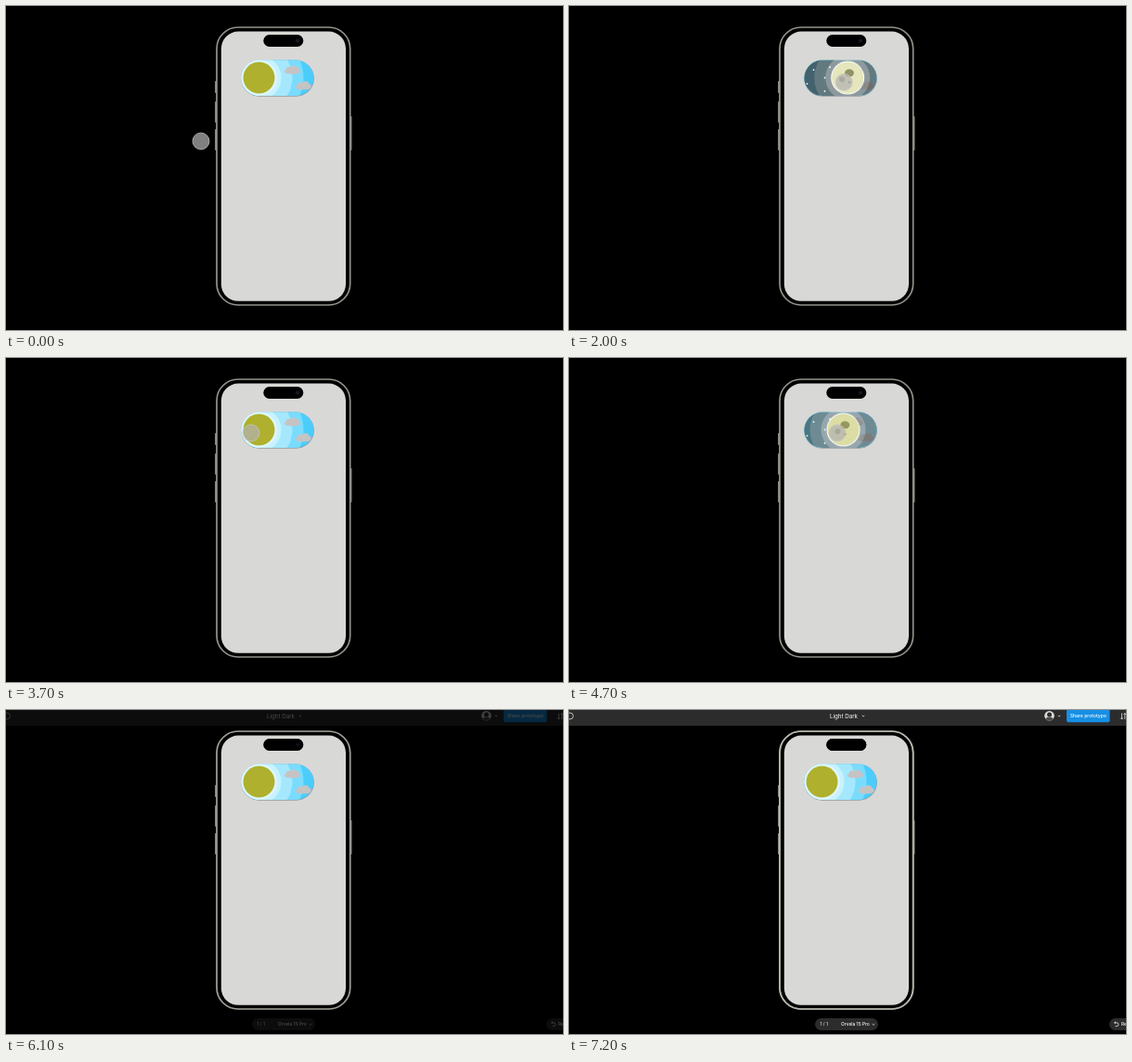
An HTML page for the animation above (7300 ms loop, 600 by 350 pixels).

```html
<!DOCTYPE html>
<html lang="en">
<head>
<meta charset="utf-8">
<title>Light Dark</title>
<style>
  html, body { margin: 0; width: 100%; height: 100%; overflow: hidden; background: #000; }
  svg { display: block; width: 600px; height: 350px; }
  text { font-family: Inter, Roboto, sans-serif; fill: #fff; }
  .line { fill: none; stroke: #e4e4e4; stroke-width: .8; }
</style>
</head>
<body>
<svg viewBox="0 0 600 350">
  <defs>
    <clipPath id="pill"><rect x="253.5" y="58.5" width="78" height="38.5" rx="19.25"/></clipPath>
    <clipPath id="face"><circle cx="517.5" cy="6.2" r="5.3"/></clipPath>
    <path id="caret" d="M-1.3-.6 0 .6 1.3-.6"/>
    <g id="cloud">
      <ellipse cy="1.8" rx="8.5" ry="2.8"/>
      <circle cx="-3" cy="0" r="3.4"/>
      <circle cx="2.5" cy="-1" r="3.8"/>
      <circle cx="6" cy="1" r="2.8"/>
    </g>
  </defs>

  <g id="phone">
    <g fill="#85867d">
      <rect x="225" y="81" width="2" height="13" rx=".8"/>
      <rect x="225" y="103" width="2" height="23" rx=".8"/>
      <rect x="225" y="133" width="2" height="23" rx=".8"/>
      <rect x="370.5" y="119" width="2" height="37" rx=".8"/>
    </g>
    <rect x="227" y="23" width="143.7" height="300" rx="23" fill="#000" stroke="#92938a" stroke-width="1.7"/>
    <rect x="231.8" y="27.5" width="134.2" height="291.3" rx="18.5" fill="#d8d8d6"/>
    <rect x="277.3" y="31" width="43" height="13" rx="6.5"/>
    <circle cx="314" cy="37.5" r="2.3" fill="#11131b"/>
    <circle cx="314" cy="37.5" r=".8" fill="#1d2436"/>
  </g>

  <rect x="253.3" y="58.8" width="78.6" height="39" rx="19.5" fill="#8d9ba3"/>
  <g clip-path="url(#pill)">
    <g>
      <rect x="253" y="58" width="80" height="40" fill="#4bcdfb"/>
      <g class="knob">
        <circle r="48" fill="#7adcfd"/>
        <circle r="36" fill="#a5e8fd"/>
        <circle r="24" fill="#c8f2fe"/>
        <circle r="19.5" fill="#def7ff"/>
      </g>
      <g fill="#c6c3c4">
        <use href="#cloud" x="308" y="69"/>
        <use href="#cloud" x="320" y="86"/>
      </g>
      <circle class="knob" r="17" fill="#afb02d"/>
    </g>
    <g id="night">
      <rect x="253" y="58" width="80" height="40"/>
      <g class="knob">
        <circle r="48" fill="#292929"/>
        <circle r="36" fill="#454545"/>
        <circle r="24" fill="#707070"/>
      </g>
      <g id="stars" fill="#fff"></g>
      <g class="knob">
        <circle r="18" fill="#fff"/>
        <g fill="#858585">
          <ellipse cx="1.8" cy="-5.2" rx="5" ry="4"/>
          <circle cx="-6" cy="1.8" r="3"/>
          <circle cx="1.8" cy="4.8" r="1.4"/>
        </g>
      </g>
    </g>
  </g>

  <g id="cursor">
    <circle id="touch" r="9" fill="#b2b2b2" fill-opacity=".72" stroke="#c8c8c8" stroke-opacity=".8" stroke-width=".9"/>
    <path id="hand" d="M-1.1-4.2q.8-.9 1.4 0v2.2l2.1.5q.8.3.7 1.2L2.5 3.2H-1.1L-3 .6q.2-1.2 1.9-.2z" fill="#fff" stroke="#111" stroke-width=".9"/>
  </g>

  <g id="ui">
    <rect x="227" y="23" width="143.7" height="300" rx="23" fill="none" stroke="#b7b8ac" stroke-width="1.7"/>
    <rect x="277.3" y="31" width="43" height="13" rx="6.5"/>
    <rect width="600" height="17" fill="#2c2c2c"/>
    <circle class="line" cx="1" cy="6.5" r="3.5"/>
    <text x="281" y="8.8" font-size="6.2">Light Dark</text>
    <g clip-path="url(#face)">
      <rect x="512" width="12" height="12" fill="#d9dcda"/>
      <ellipse cx="517.5" cy="11.5" rx="5" ry="4" fill="#4a4d44"/>
      <circle cx="517.5" cy="5" r="2.5" fill="#302e2b"/>
    </g>
    <rect x="536" y="-1" width="46.5" height="14.3" rx="2" fill="#168fe4"/>
    <text x="559.3" y="8.4" font-size="5.1" font-weight="500" text-anchor="middle">Share prototype</text>
    <path class="line" d="M595.5 3.5v6.5m-1.4-1.5 1.4 1.5 1.4-1.5M598.8 10V3.5m-1.4 1.5 1.4-1.5 1.4 1.5"/>
    <g fill="#2c2c2c">
      <rect x="265" y="333" width="68" height="13" rx="6.5"/>
      <rect x="582" y="333" width="40" height="13" rx="6.5"/>
    </g>
    <g font-size="4.9">
      <text x="270.5" y="341.2">1 / 1</text>
      <text x="293" y="341.2" font-weight="500">Orvela 15 Pro</text>
      <text x="595" y="341.2" font-weight="500">Restart</text>
    </g>
    <path class="line" d="M589 336.5l-1.5 1.3 1.5 1.3m-1.5-1.3h2.5a1.9 1.9 0 0 1 0 3.8h-1.5"/>
    <g class="line">
      <use href="#caret" x="317" y="6.5"/>
      <use href="#caret" x="528" y="6.5"/>
      <use href="#caret" x="328" y="339.7"/>
    </g>
  </g>
</svg>

<script>
const LOOP = 7300, STEP = 100, RESTART = 6000;
const el = id => document.getElementById(id);
const knobs = document.querySelectorAll('.knob');

const cursorPath = [
  [0, 210, 146], [800, 264, 88], [1300, 272, 84], [1500, 271, 83],
  [2300, 308, 82], [2700, 313.5, 82], [2900, 313.5, 82],
  [3600, 265, 81], [3700, 264, 81], [4100, 264, 81], [5200, 308, 81], [5400, 307, 81.5]
];
const nightPath = [[1500, 0], [2300, 1], [2900, 1], [3600, 0], [4100, 0], [5200, 1]];
const uiPath = [[5900, 0], [6400, .72], [7200, 1]];

const smooth = k => k * k * (3 - 2 * k);
const linear = k => k;

// Interpolates [time, ...values] rows, holding the first and last ones.
function sample(rows, t, ease = smooth) {
  if (t <= rows[0][0]) return rows[0].slice(1);
  const i = rows.findIndex(row => row[0] > t);
  if (i < 0) return rows[rows.length - 1].slice(1);
  const [a, b] = [rows[i - 1], rows[i]];
  const k = ease((t - a[0]) / (b[0] - a[0]));
  return a.slice(1).map((v, n) => v + (b[n + 1] - v) * k);
}

const stars = [[263.5, 69], [256.5, 84], [275.5, 77.5], [281, 66], [275.5, 92], [291.5, 67], [291, 88]];
el('stars').innerHTML = stars.map(([x, y]) => `<circle cx="${x}" cy="${y}" r=".9"/>`).join('');

function draw(t) {
  const restarted = t >= RESTART;
  const night = restarted ? 0 : sample(nightPath, t)[0];
  const [x, y] = sample(cursorPath, t);
  const pointing = t >= 900 && t < 1500;

  knobs.forEach(k => k.setAttribute('transform', `translate(${272.5 + 40.5 * night} 77.5)`));
  el('night').setAttribute('opacity', night);
  el('cursor').setAttribute('transform', `translate(${x} ${y})`);
  el('touch').setAttribute('opacity', pointing || restarted ? 0 : 1);
  el('hand').setAttribute('opacity', pointing ? 1 : 0);
  el('ui').setAttribute('opacity', restarted ? sample(uiPath, t, linear)[0] : 0);
}

const start = performance.now();
function frame() {
  const t = (performance.now() - start) % LOOP;
  draw(Math.floor(t / STEP) * STEP);
  requestAnimationFrame(frame);
}
frame();
</script>
</body>
</html>
```
